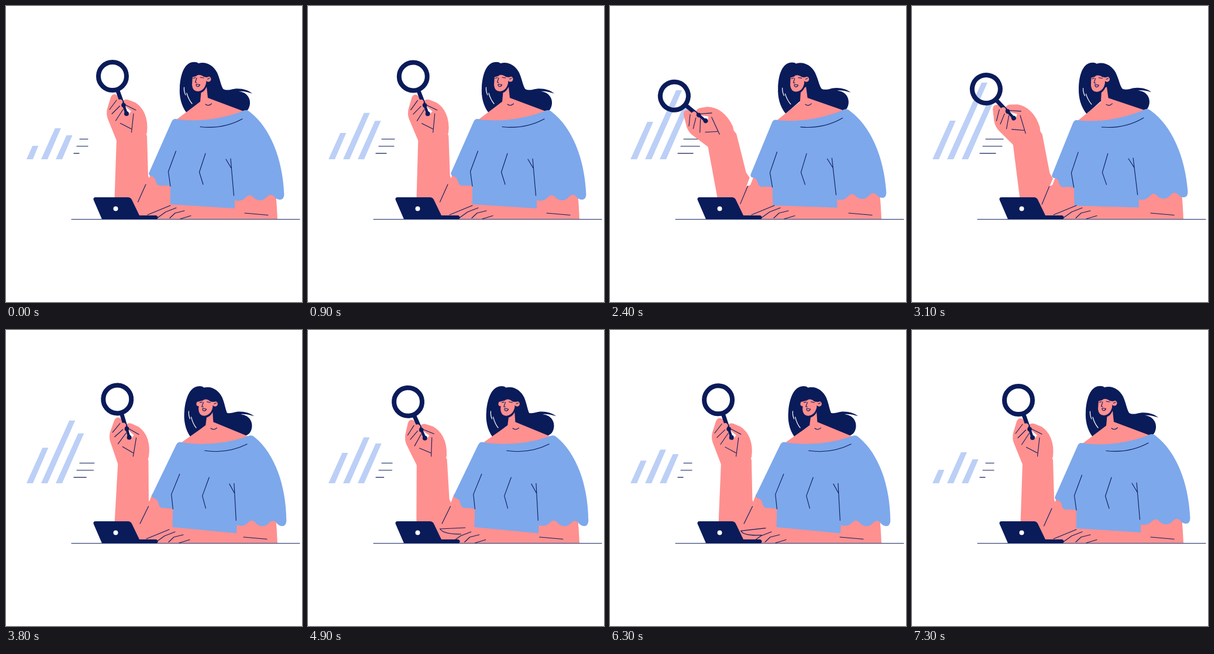
Recreate the animation shown at these times as an HTML page. Size 506 by 506 pixels, loop 7400 ms.

```html
<!DOCTYPE html>
<html lang="en">
<head>
<meta charset="utf-8">
<title>Searching at a desk</title>
<style>
  html, body { margin: 0; width: 100%; height: 100%; overflow: hidden; background: #fff; }
  svg { display: block; width: 100%; height: 100%; }
  .navy { fill: #0a1b5a; }
  .skin { fill: #ff9090; }
  .cloth { fill: #7da8eb; }
  .bar { fill: #bccff6; }
  .line { fill: none; stroke: #0a1b5a; stroke-width: 1.1; stroke-linecap: round; stroke-linejoin: round; }
  .handle { fill: none; stroke: #0a1b5a; }
  .shine { fill: none; stroke: #fff; stroke-width: 1.2; stroke-linecap: round; }
</style>
</head>
<body>
<svg viewBox="0 0 506 506">
  <g id="bars"></g>
  <g id="dashes"></g>

  <!-- upper arm and the arm resting on the desk -->
  <path class="skin" d="M186 326 L240 306 L250 280 L300 300 L300 334 L380 336 L380 320 L461 318 Q463 340 464 364 L258 364 L256 358 L226 358 L200 340 Z"/>
  <path id="forearm" class="skin" d="M189 227 L185.500 330 L215 350 L247 300 L243 290 L241 222 L236 212 Z"/>

  <g id="body">
    <g id="hair">
      <path id="tail" class="navy" d="M362 130 C367 142 373 145 384 143 C397 139 412 142 421 149.500 C410 146 403 145 398 146 C411 147 418 157 417 167 C416 176 412 181 404 183 L340 165 Z"/>
      <path class="navy" d="M309 183 C299 170 296 154 297 139 C298 119 304 98 319 96 Q326 95 329 98 C342 94 355 102 361 114 C368 130 367 140 376 147 L384 172 L346 158 L333 163 Z"/>
      <path class="shine" d="M304.500 139 Q304 146 307 152 M309 149 Q312 160 318 167"/>
    </g>
    <path class="skin" d="M289 196 L332 163.500 L334 142 L343 138 L345 157 L409 181 Q350 206 289 196 Z"/>
    <path class="line" d="M341 168 Q346 172 351.500 167"/>
    <g id="face">
      <path class="navy" d="M322 142 Q325 149 331 149 Q341 147 345 132 L340 128 Z"/>
      <circle id="farEar" class="skin" cx="318" cy="126" r="4"/>
      <circle class="skin" cx="346" cy="125" r="4.500"/>
      <path class="skin" d="M319 119 L318 135 Q319 146 328 146 Q339 145 342 132 L343 119 Q330 112 319 119 Z"/>
      <path class="navy" d="M317 122 Q320 114 331 112 Q344 113 347 121 Q339 123 335 119 Q328 116 325 120 Z"/>
      <path class="line" d="M320 123.500 L324 122.500 M332 122 L338 123 M326 123 L323.500 130.500 L326 131 M325 133.500 L331.500 134.500 Q330 138.500 326.500 137.500 Q324.500 136 325 133.500 M344.500 125 L348 123.500"/>
    </g>
    <path class="cloth" d="M283 198 Q286 191 294 194 Q350 200 404 180 Q411 175 418 182 C451 208 473 260 475.500 322 Q475 332 467 331 Q461 330 458 325 Q452 320 446 326 Q441 333 432 332 Q426 331 422 326 Q416 320 409 328 Q402 335 391 332 L391 346 L281 339 L281 308 Q270 306 263 307 Q257 306 256 299 Q254 292 249 291 Q243 290 244.500 285 Z"/>
    <path class="line" d="M332 206.500 Q371 211 404 193 M290.500 248 L277.500 283 L281 308 M341 252 L330.500 284 L337 305 M376 262 L385 277 M384 261 L389.500 324 M239 305 L225.500 335"/>
  </g>

  <path id="deskHand" class="line" d="M259 362 L273 352 L291 345 M280 362.500 L289 354 L305 350 M298 364 L316 358.500 M408 354 L448 357.500"/>
  <path id="thumb" class="line"/>
  <path id="thumbUnder" class="line"/>

  <g id="hand">
    <path class="skin" d="M189 230 L174 193 Q171 185 173 176 L179 156 Q183 148 190 153 L194 163 L200 162 Q204 158 211 161 L221 165 Q232 172 237 184 Q243 198 241 216 L236 232 L200 238 Z"/>
    <path d="M203 171 L214 180 L208 187 Z" fill="#fff"/>
    <circle class="handle" cx="182" cy="120" r="24" stroke-width="8"/>
    <path class="handle" d="M191 145 L198.500 166" stroke-width="7"/>
    <path class="handle" d="M199 164 L206 184" stroke-width="4.500"/>
    <circle class="skin" cx="195" cy="164" r="4.500"/>
    <circle class="navy" cx="201" cy="169.500" r="3.800"/>
    <circle class="navy" cx="206" cy="184" r="4"/>
    <path class="line" d="M189 161 L177 177 M194.500 171 L181 184.500 M200 177 L187.500 196 M200 167 L222 178 M195.500 200.500 L214 210 M218 184 L214.500 216"/>
  </g>

  <path class="navy" d="M153 327 H208 Q213 327 215 331 L228 358 H257 Q262 361 258 364.500 H164 L149.500 331 Q149 327 153 327 Z"/>
  <circle cx="187.500" cy="346.500" r="4" fill="#fff"/>
  <path class="line" d="M112 364.800 H502"/>
</svg>

<script>
const LOOP = 7400, STEP = 100, PEAK = 3100, END = 7300;
const FLOOR = 262, SLANT = 0.45, BAR_WIDTH = 11;
const WRIST = [215, 222], ELBOW = [213, 335], WAIST = [345, 440];
const $ = id => document.getElementById(id);

// rise and fall are the easing powers of each bar.
const bars = [
  { low: 23, high: 66, rise: 2.1, fall: 0.7 },
  { low: 53, high: 131, rise: 1.2, fall: 2 },
  { low: 41, high: 97, rise: 1.7, fall: 1.3 },
];
const dashes = [{ low: 14, high: 30 }, { low: 19, high: 33 }, { low: 9, high: 27 }];

function addPaths(parent, items, className) {
  for (const item of items) {
    item.path = document.createElementNS("http://www.w3.org/2000/svg", "path");
    item.path.setAttribute("class", className);
    $(parent).append(item.path);
  }
}
addPaths("bars", bars, "bar");
addPaths("dashes", dashes, "line");

const progress = (t, start, end) => Math.min(1, Math.max(0, (t - start) / (end - start)));
const easeOut = (u, power) => 1 - (1 - u) ** power;
const mix = (a, b, u) => a + (b - a) * u;
const move = (id, transform) => $(id).setAttribute("transform", transform);
const rotate = (angle, [x, y]) => `rotate(${angle} ${x} ${y})`;

function smooth(t, start, end) {
  const u = progress(t, start, end);
  return u * u * (3 - 2 * u);
}

// Grows until PEAK, then shrinks back by the given end.
const swell = (t, end, rise, fall) =>
  easeOut(progress(t, 0, PEAK), rise) - easeOut(progress(t, PEAK, end), fall);

function drawChart(t) {
  bars.forEach(({ low, high, rise, fall, path }, i) => {
    const x = 35 + 25 * i;
    const height = mix(low, high, swell(t, END, rise, fall));
    path.setAttribute("d", `M${x} ${FLOOR} l${height * SLANT} ${-height} h${BAR_WIDTH - 1} L${x + BAR_WIDTH} ${FLOOR} Z`);
  });
  dashes.forEach(({ low, high, path }, i) => {
    const length = mix(low, high, swell(t, 6000, 2, 1.4));
    path.setAttribute("d", `M${126 - 5 * i} ${227.5 + 12.2 * i} h${length}`);
  });
}

function drawSearchingArm(t) {
  const angle = -31 * smooth(t, 800, 1800) + 34.2 * smooth(t, 2800, 3750)
    - 7.5 * smooth(t, 3800, 4900) + 5.5 * smooth(t, 4900, 6300) - 1.2 * smooth(t, 6300, END);
  const armAngle = angle * 0.4;
  move("forearm", rotate(armAngle, ELBOW));
  // The hand follows the forearm, then bends further at the wrist.
  move("hand", `${rotate(armAngle, ELBOW)} ${rotate(angle - armAngle, WRIST)}`);
}

function drawBody(t) {
  const turn = smooth(t, PEAK, 3800) - smooth(t, 6300, END);
  const glance = -2 * (smooth(t, 1000, 1700) - smooth(t, PEAK, 3800));
  const lean = 1.9 * (turn - smooth(t, 1700, 2700) + smooth(t, PEAK, 3800));
  move("body", rotate(lean, WAIST));
  move("hair", `translate(${glance - 2 * turn} ${turn})`);
  move("face", `translate(${glance + turn} ${turn})`);
  move("tail", `translate(${-4 * turn} ${-4 * turn}) ${rotate(-3 * turn, [390, 160])}`);
  $("farEar").setAttribute("r", 4 * turn);
}

function drawDeskHand(t) {
  const slide = -15 * (smooth(t, 3300, 5500) - smooth(t, 6300, END));
  const lift = smooth(t, 3800, 4900) - smooth(t, 5900, END);
  const x = 242 + slide - 4 * lift, y = 357 - 17 * lift;
  move("deskHand", `translate(${slide} 0)`);
  $("thumb").setAttribute("d", `M${x} ${y} L${281 + slide} ${341 - 3 * lift}`);
  $("thumbUnder").setAttribute("d", `M${x} ${y} Q${x + 5} ${y + 9} ${274 + slide} ${357 - 8 * lift}`);
  $("thumbUnder").setAttribute("opacity", Math.min(1, lift * 2));
}

function tick() {
  const now = performance.now() % LOOP;
  const t = now - now % STEP;
  drawChart(t);
  drawSearchingArm(t);
  drawBody(t);
  drawDeskHand(t);
  requestAnimationFrame(tick);
}
tick();
</script>
</body>
</html>
```
